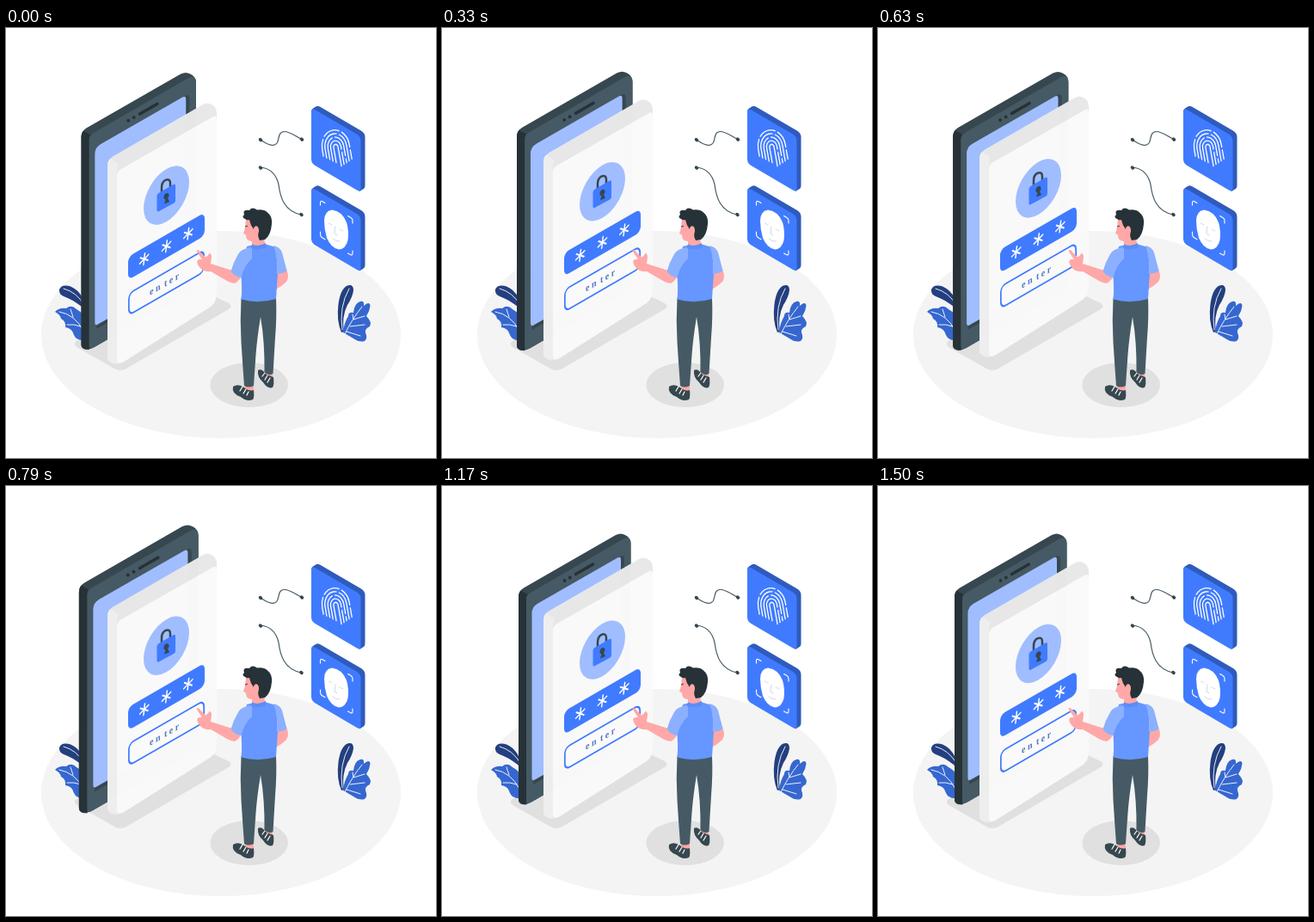
Recreate the animation shown at these times as an HTML page. Size 500 by 500 pixels, loop 1540 ms.

```html
<!DOCTYPE html>
<html lang="en">
<head>
<meta charset="utf-8">
<title>Secure login</title>
<style>
html, body { margin: 0; height: 100%; overflow: hidden; background: #fff; }
svg { display: block; width: 100vw; height: 100vh; }
.line { fill: none; stroke-linecap: round; stroke-linejoin: round; }
text { font: bold 11.5px "Liberation Serif", serif; letter-spacing: 3px; }
</style>
</head>
<body>
<svg viewBox="0 0 500 500">
  <defs>
    <g id="star" class="line" stroke="#fff" stroke-width="1.800">
      <path transform="rotate(8)" d="M0-6.3V6.3M-5.5-3.2L5.5 3.2M-5.5 3.2L5.5-3.2"/>
    </g>
    <g id="card">
      <path fill="#2f5bbd" d="M355 97Q355 94.500 357 93.500L360.500 91.300Q362.500 90 365 91.500L413 119.500Q417.500 122 417.500 127V183.500Q417.500 186 415.500 187.300L411 190Z"/>
      <path fill="#407bff" d="M355 98Q355 92.500 360 95.500L408 123.500Q412.500 126.500 412.500 131V186.500Q412.500 191 408 188.500L359.500 160Q355 157.500 355 152.500Z"/>
    </g>
    <g id="link-end" fill="#37474f"><ellipse rx="2.500" ry="1.900" transform="rotate(40)"/></g>
  </defs>

  <ellipse cx="250" cy="356.500" rx="209" ry="120.500" fill="#f4f4f4"/>
  <ellipse cx="282.700" cy="415" rx="45.300" ry="26" fill="#e0e0e0"/>
  <path fill="#e0e0e0" d="M82 364L120 342L240 311L258 319.500Q265 323.500 258 327.500L140 396Q133 400 126 396L83 371.500Q77 367.500 82 364Z"/>

  <g id="plants">
    <path fill="#233f80" d="M62 304Q65 297.500 75 300.500Q91 307 94 332L88 324Q76 315 67 312Q61 309 62 304Z"/>
    <path fill="#3667d0" d="M57 330Q62 325 70 326Q76 321 82 327Q92 332 94 345L92 363Q82 364 79 357Q77 349 69 348Q70 341 64 338Q63 333 57 330Z"/>
    <path class="line" stroke="#fff" stroke-width=".900" d="M67 303Q82 307 91 322M62 330Q80 333 90 352M75 327L78 336M71 345Q78 344 87 347"/>
    <path fill="#233f80" d="M390 354Q384 340 386.500 321Q389 303 397 299.500Q404 297.500 404 305Q403 313 397 322Q390 336 393 353Z"/>
    <path fill="#3667d0" d="M392 354Q393 343 398 335Q398 330 404 331Q405 320 412 318Q417 317 416 323Q423 317 423.500 323Q423 329 419 335Q426 342 423 347Q417 350 418 354Q421 361 417 364Q411 366 404 361Z"/>
    <path class="line" stroke="#fff" stroke-width=".900" d="M399 303Q387 324 391 351M414 324Q402 339 394 356M403 333L404 339L417 335M400 347L417 345M396 353L412 358"/>
  </g>

  <g id="phone">
    <path fill="#37474f" d="M89 129Q89 122 95 118.500L202 57Q208 54 213 57Q219.500 60 219.500 67V294Q219.500 300 214 304L104 367.500Q98 371 93 370Q89 368.500 89 365Z"/>
    <path fill="#263238" d="M89 129Q89 124 91.500 121.500L99.500 126Q98 128 98 132V370.500Q89 370 89 365Z"/>
    <path fill="#455a64" d="M98 132Q98 127 103 124L211 61.500Q219.500 57.500 219.500 67V294Q219.500 300 214 304L104 367.500Q98 371 98 366Z"/>
    <path fill="#37474f" d="M108 138L207 82Q212 79 212 86V288L106 347Z"/>
    <path fill="#a0bdff" d="M104.500 148Q104.500 140.500 111 136.700L204 83.500Q208 81 208 86V285L108 341.500Q104.500 344 104.500 339Z"/>
    <path class="line" stroke="#263238" stroke-width="3.400" d="M155.500 102.500L175.500 91"/>
    <g fill="#263238"><circle cx="142.500" cy="110" r="1.900"/><circle cx="148.800" cy="106.500" r="1.900"/></g>
  </g>

  <g id="panel">
    <g opacity=".993">
      <path fill="#e8e8e8" d="M118 161Q118 154 124 150L228 90Q234 86 240 90Q245 93 245 100V309Q245 319 238 324.500L137 388.500Q130 393 122 389Q118 387 118 384Z"/>
      <path fill="#efefef" d="M118 161Q118 155 121 152.500L131 158.500Q129 162 129 169V391.500Q118 390 118 384Z"/>
      <path fill="#fafafa" d="M129 173Q129 167.500 133 165L240 104Q245 101 245 107V309Q245 319 238 324.500L137 388.500Q129 393 129 386Z"/>
    </g>
    <circle r="30.600" fill="#a0bdff" transform="matrix(.866 -.5 0 1 186.500 195)"/>
    <path class="line" stroke="#37474f" stroke-width="2.500" d="M181 192V186Q181 180 185 177.500Q191 175 191 181V187"/>
    <path fill="#407bff" d="M175.500 196Q175.500 193.500 177.500 192.500L194.500 182.500Q197 181 197 184V201Q197 203 195.500 204L178 213.500Q175.500 215 175.500 212Z"/>
    <path fill="#37474f" d="M183.500 198Q183 194 186.500 192.500Q190 192 189.500 196L188 198.500L190 202.500L184 205L185.500 200Q184 200 183.500 198Z"/>
    <g transform="matrix(.866 -.5 0 1 186.500 254.200)">
      <rect x="-51.400" y="-13.500" width="102.800" height="27" rx="6.500" fill="#407bff"/>
      <use href="#star" x="-29.800"/><use href="#star"/><use href="#star" x="29.300"/>
    </g>
    <g transform="matrix(.866 -.5 0 1 186.500 296.500)">
      <rect x="-50.400" y="-12.600" width="100.800" height="25.200" rx="6.500" fill="#fafafa" stroke="#407bff" stroke-width="2"/>
      <text x="-22.500" y="3.700" fill="#5276c8">en<tspan dx="2">t</tspan>er</text>
    </g>
  </g>

  <g id="cards">
    <use href="#card"/>
    <use href="#card" y="92.500"/>
    <g id="print" class="line" stroke="#fff" stroke-width="1.300" transform="translate(383.500 138.500) rotate(-10)"></g>
    <path fill="#fff" d="M370 224Q370 213 379 211.500Q391 213 396 226Q399 236 397.500 247Q395 257 387 257.500Q378 256 373 244Q370 234 370 224Z"/>
    <path class="line" stroke="#c3cde0" stroke-width=".800" d="M375.500 227L379 229M388 234L392 236M383 231L382 239L385 241M380 245Q384 249 388 248"/>
    <path class="line" stroke="#fff" stroke-width="1.100" d="M365.500 206V203Q365.500 200.500 368 201.700L371 203.500M397.500 218.500L401 220.500Q403 221.700 403 224V227M365.500 237V240Q365.500 242.500 368 244L371 245.700M397.500 262L400.500 263.500Q403 265 403 262V259"/>
  </g>

  <g id="links">
    <path class="line" stroke="#455a64" stroke-width="1.200" d="M296 130C303 135 311 139 315 134C318 130 316 121 323 120.500C330 120 337 126 344 129.500M296 162C306 163 314 169 317 182C319 198 324 213 343 217"/>
    <use href="#link-end" x="296" y="130"/><use href="#link-end" x="344" y="129.500"/>
    <use href="#link-end" x="296" y="162.500"/><use href="#link-end" x="343.500" y="217"/>
  </g>

  <g id="man">
    <path fill="#ffa8a7" d="M278 412H288V426L278 422ZM300 397H310V411L301 406Z"/>
    <path fill="#37474f" d="M293 398Q297 395 303 403L311 406Q312 415 310 418Q304 420 299 412Q292 406 293 398ZM264 417Q270 413 277 418Q283 423 288 421Q289 430 287 432Q280 435 273 429Q262 425 264 417Z"/>
    <path class="line" stroke="#fff" stroke-width="1.200" d="M272 422L275 417M276 425L279 420M280 427L282 423M298 405L301 401M301 409L304 404M304 412L307 407"/>
    <path fill="#455a64" d="M273.500 314Q294 320 314 314Q315 335 313 360L310.500 402Q305 405 300.500 400Q301 365 296 336Q292 360 290.500 380L288 416Q282 419 277 416Q275 390 273.500 365Q272 340 273.500 314Z"/>
    <path fill="#ffa8a7" d="M314 286L326 280Q330 290 326 295Q320 301 313 304.500Z"/>
    <path fill="#ffa8a7" d="M221.500 258.500Q224 257 226.500 261L232 266.500Q235 265 236.500 262Q239 262 239 266.500L238 274L263 282L276 284Q272 294 266 297Q262 297 257 294L238 283Q229 284 225 278Q221.500 274 222.500 270.500Q224.500 268 228 269Q223 262 221.500 258.500Z"/>
    <path fill="#6696ff" d="M280 254Q292 250 304 252L314 255L316 285L314 315Q294 321 273.500 315.500Q275 300 273 286Z"/>
    <path fill="#8bb0ff" d="M286 255Q274 256 270 263Q264 273 261.500 283Q267 290 273.500 290Q277 276 286 268ZM311 253Q319 255 321 261L326.500 282Q321 287 314.500 285Q317 270 311 253Z"/>
    <path fill="#ffa8a7" d="M279 222L278 232L276 239L279 240.500Q279 248 286 248V252Q294 256 301 251L299 230L288 222Z"/>
    <path fill="#5c8df5" d="M286 251.500Q293 255 302 250L303 255Q293 259 285 256Z"/>
    <path fill="#263238" d="M278 222Q273.500 220 277 217Q274.500 211 283 212Q286 207.500 292 211.500Q300 210.500 304 214.500Q310 219 309 228Q308 241 301 246L295 247Q292 242 294 236Q293 229 289 231L288 234Q284 229 283 223Q280 224 278 222Z"/>
    <ellipse cx="291" cy="235" rx="2.800" ry="4.500" fill="#ffa8a7"/>
    <path class="line" stroke="#263238" d="M278.500 231L280.500 230.200"/>
  </g>
</svg>
<script>
const LOOP = 1540, STEPS = 37;
const $ = id => document.getElementById(id);

// Fingerprint: nested arches with gaps, inner ones reaching lower
$('print').innerHTML = [2.6, 6, 9.3, 12.6, 16].map((r, i) =>
  `<path stroke-dasharray="${[90, 40, 27, 36, 20][i]} 3.5"
    d="M${-r} ${18 - i * 2.5}V0A${r} ${r * 1.25} 0 0 1 ${r} 0V${23 - i * 1.5}"/>`).join('');

// Linear interpolation through [position, value] pairs
function track(keys, p) {
  const i = keys.findIndex(k => k[0] > p);
  const [[a, from], [b, to]] = [keys[i - 1], keys[i]];
  return from + (to - from) * (p - a) / (b - a);
}

const beat = [[0, 1], [.1, 1.1], [.3, 1], [.4, 1], [.5, 1.1], [.6, 1], [1, 1]];
const float = [[0, 0], [.5, -10], [1, 0]];

function draw() {
  const t = performance.now() % LOOP;
  const step = Math.floor((t + 5) / LOOP * STEPS) % STEPS;
  const p = (step + .85) / STEPS;
  const scale = track(beat, p);
  $('phone').setAttribute('transform', `translate(154.2 213) scale(${scale}) translate(-154.2 -213)`);
  $('panel').setAttribute('transform', `translate(0 ${track(float, p)})`);
  requestAnimationFrame(draw);
}
draw();
</script>
</body>
</html>
```
